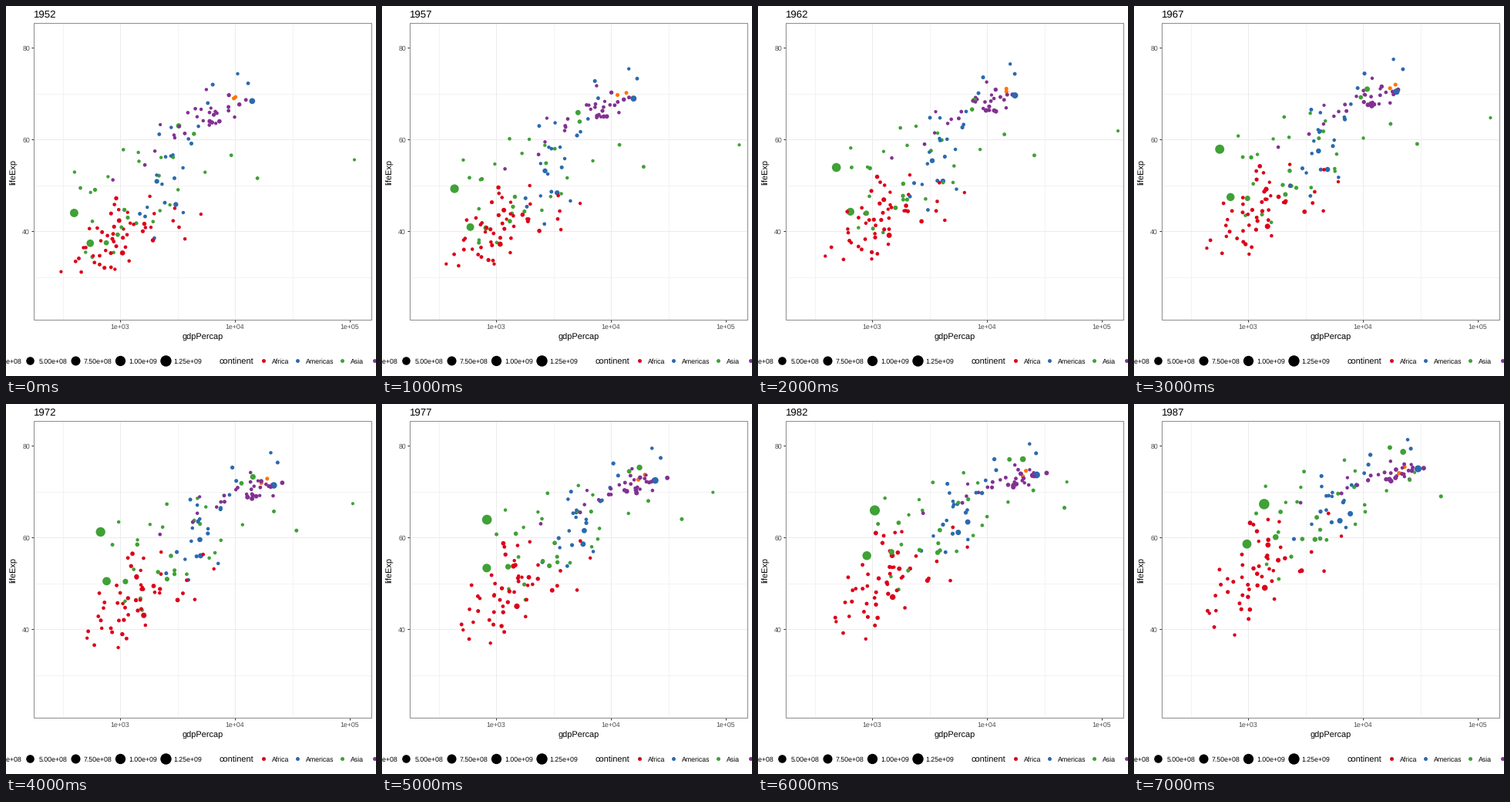
A matplotlib script that plays this animation: 480x480 px, repeating every 8000 ms.

```python
import numpy as np
import matplotlib.pyplot as plt
from matplotlib.animation import FuncAnimation
from matplotlib.patches import Rectangle

plt.rcParams["font.family"] = "Liberation Sans"
plt.rcParams["text.hinting"] = "none"

SIZE, DPI = 480, 72          # at 72 dpi one point is one pixel
YEARS = np.arange(1952, 1988, 5)
LEFT, RIGHT, TOP, BOTTOM = 36, 474, 22, 407

COLORS = {
    "Africa": "#dc0019",
    "Americas": "#2a6aae",
    "Asia": "#3fa136",
    "Europe": "#823192",
    "Oceania": "#ff7300",
}

# Eye-catching countries: log income and life expectancy as (start, end, bend),
# then population in millions.
GIANTS = [
    ("Asia", (2.60, 3.14, -0.08), (44.0, 67.3, 4.0), 556),
    ("Asia", (2.74, 2.99, 0.00), (37.4, 58.6, 1.0), 372),
    ("Asia", (3.51, 4.35, 0.17), (63.0, 78.7, 1.3), 86),
    ("Asia", (2.88, 3.24, -0.04), (37.5, 60.1, 0.0), 82),
    ("Asia", (5.04, 4.45, 0.33), (55.6, 74.2, 1.2), 0.2),
    ("Americas", (4.15, 4.48, 0.00), (68.4, 75.0, -0.8), 157),
    ("Americas", (3.32, 3.89, 0.05), (50.9, 65.2, 0.5), 57),
]

# All others: count, log income and life means (start, end), income spread,
# life spread (start, end), correlation, direction of the long tail.
CLOUDS = {
    "Africa": (52, (3.00, 3.10), (39.3, 53.5), 0.28, (4.8, 7.0), 0.40, 1),
    "Americas": (23, (3.48, 3.79), (53.5, 68.2), 0.25, (8.5, 5.0), 0.65, 1),
    "Asia": (28, (3.12, 3.60), (47.0, 64.5), 0.42, (8.5, 7.5), 0.60, 1),
    "Europe": (30, (3.70, 4.20), (65.0, 73.8), 0.27, (5.0, 2.4), 0.85, -1),
    "Oceania": (2, (4.01, 4.31), (69.2, 75.3), 0.02, (0.2, 1.0), 0.50, 1),
}

rng = np.random.default_rng(7)
progress = (YEARS - YEARS[0]) / (YEARS[-1] - YEARS[0])


def arc(start, end, bend=0):
    """Straight change over the years, bowed by `bend` halfway."""
    return start + (end - start) * progress + bend * 4 * progress * (1 - progress)


def to_x(log_gdp):
    return 148 + 149 * (log_gdp - 3)


def to_y(life):
    return 292.3 - 5.95 * (life - 40)


def radius(pop):
    """Area scale for a population in millions."""
    return 2 + 5.335 * np.sqrt(pop / 1319)


def country(continent, log_gdp, life, pop):
    pops = pop * 1.9 ** progress
    return COLORS[continent], to_x(log_gdp), to_y(life), (2 * radius(pops)) ** 2


def cloud(continent):
    count, gdp, life, spread, life_spread, corr, tail = CLOUDS[continent]
    mean_gdp, mean_life, width = arc(*gdp, 0.08), arc(*life), arc(*life_spread)
    for _ in range(count):
        wealth = tail * min((rng.gamma(4) - 4) / 2, 2.8)
        luck = np.clip(rng.normal(), -1.8, 1.8)
        health = corr * wealth + np.sqrt(1 - corr ** 2) * luck
        drift = rng.normal(0, 0.25) * progress
        wobble = rng.normal(0, 0.02, len(YEARS))
        yield country(continent, mean_gdp + spread * (wealth + drift) + wobble,
                      mean_life + width * (health + drift), 10 ** rng.normal(0.75, 0.45))


countries = [country(c, arc(*gdp), arc(*life), pop) for c, gdp, life, pop in GIANTS]
for name in CLOUDS:
    countries.extend(cloud(name))
countries = [countries[i] for i in rng.permutation(len(countries))]

colors = [c[0] for c in countries]
xs, ys, areas = (np.array([c[k] for c in countries]) for k in (1, 2, 3))

fig = plt.figure(figsize=(SIZE / DPI, SIZE / DPI), dpi=DPI, facecolor="white")
ax = fig.add_axes((0, 0, 1, 1))
ax.set(xlim=(0, SIZE), ylim=(SIZE, 0))
ax.axis("off")


def line(x, y, color, width=1):
    ax.plot(x, y, color=color, lw=width, zorder=1, solid_capstyle="butt")


def label(x, y, text, size, color="black", **kw):
    return ax.text(x, y, text, fontsize=size, color=color, **kw)


def dot(x, r, color):
    ax.scatter([x], [460], s=(2 * r) ** 2, c=color, linewidths=0, zorder=4)


# Grid, ticks and frame
for i in range(5):
    x, y = to_x(2.5 + 0.5 * i), to_y(30 + 10 * i)
    width = 1 if i % 2 else 0.6
    line((LEFT, RIGHT), (y, y), "#ebebeb", width)
    line((x, x), (TOP, BOTTOM), "#ebebeb", width)
for life in (40, 60, 80):
    y = to_y(life)
    line((LEFT - 3, LEFT), (y, y), "#333333")
    label(31, y + 3.4, str(life), 8.8, "#4d4d4d", ha="right")
for power in (3, 4, 5):
    x = to_x(power)
    line((x, x), (BOTTOM, BOTTOM + 3), "#333333")
    label(x, 419, f"1e+{power:02d}", 8.8, "#4d4d4d", ha="center")
ax.add_patch(Rectangle((LEFT, TOP), RIGHT - LEFT, BOTTOM - TOP, fill=False,
                       ec="#8c8c8c", lw=1, zorder=5))

label(255.2, 433, "gdpPercap", 11, ha="center")
label(9.8, 215, "lifeExp", 11, ha="center", va="center", rotation=90)

# Legends, running off both sides of the stage
for i in range(5):
    pop, x = 250 * (i + 1), -27.5 + 58.5 * i
    dot(x, radius(pop), "black")
    label(x + 11.2, 464, f"{pop * 1e6:.2e}", 8.8)
label(276.7, 464.5, "continent", 11)
for x, name in zip((334, 378, 436, 478), COLORS):
    dot(x, 2.5, COLORS[name])
    label(x + 11, 464, name, 8.8)

title = label(36, 15, "", 13.2)
points = ax.scatter(xs[:, 0], ys[:, 0], s=areas[:, 0], c=colors, linewidths=0, zorder=3)


def update(step):
    title.set_text(str(YEARS[step]))
    points.set_offsets(np.column_stack((xs[:, step], ys[:, step])))
    points.set_sizes(areas[:, step])
    return title, points


anim = FuncAnimation(fig, update, frames=len(YEARS), interval=1000, repeat=True, repeat_delay=0)
plt.show()
```
